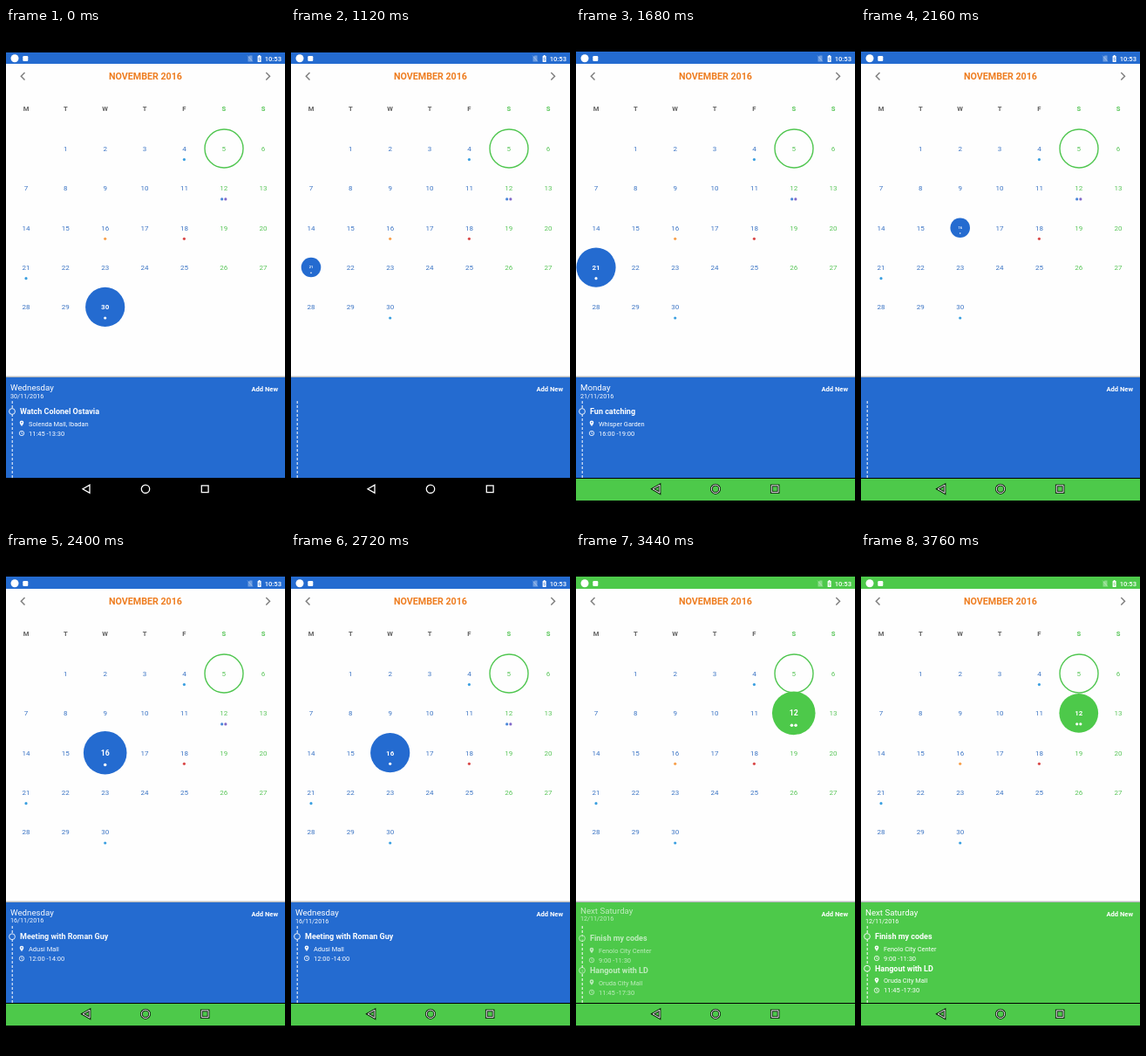
These frames come from a looping animation (320x569 px, 3840 ms). An HTML page:

```html
<!DOCTYPE html>
<html lang="en">
<head>
<meta charset="utf-8">
<title>Calendar</title>
<style>
  html, body { margin: 0; width: 100%; height: 100%; overflow: hidden; background: #000; }
  svg { display: block; width: 100vw; height: 100vh; }
  text { font-family: Roboto, "Noto Sans", sans-serif; white-space: pre; }
</style>
</head>
<body>
<svg id="stage" viewBox="0 0 320 569"></svg>
<script>
const LOOP = 3840, STEP = 80, SETTLE = 560;
const BLUE = '#246bd0', GREEN = '#4dc94a', SKY = '#3a9fe0';
const NAV_GREEN_AT = 1200;

const picks = [
  { at: -1120, day: 30, name: 'Wednesday', tint: BLUE,
    events: [['Watch Colonel Ostavia', 'Solenda Mall, Ibadan', '11:45 -13:30']] },
  { at: 1120, day: 21, name: 'Monday', tint: BLUE,
    events: [['Fun catching', 'Whisper Garden', '16:00 -19:00']] },
  { at: 2160, day: 16, name: 'Wednesday', tint: BLUE,
    events: [['Meeting with Roman Guy', 'Adusi Mall', '12:00 -14:00']] },
  { at: 3280, day: 12, name: 'Next Saturday', tint: GREEN,
    events: [['Finish my codes', 'Fenolo City Center', '9:00 -11:30'],
             ['Hangout with LD', 'Oruda City Mall', '11:45 -17:30']] }
];
const dots = { 4: [SKY], 12: ['#4a86d8', '#8068c8'], 16: ['#f8a04c'], 18: ['#d94848'], 21: [SKY], 30: [SKY] };

const colX = c => 23 + 45.35 * c;
const rowY = r => 138 + 45.35 * r;

// Text placed by the vertical middle of its capitals
const text = (s, x, y, size, fill = '#fff', weight = 400, anchor = 'start') =>
  `<text x="${x}" y="${y + size * 0.356}" font-size="${size}" fill="${fill}" font-weight="${weight}" text-anchor="${anchor}">${s}</text>`;
const rect = (x, y, w, h, fill, more = '') =>
  `<rect x="${x}" y="${y}" width="${w}" height="${h}" fill="${fill}" ${more}/>`;
const disc = (x, y, r, fill, more = '') =>
  `<circle cx="${x}" cy="${y}" r="${r}" fill="${fill}" ${more}/>`;
const line = (d, stroke, width, more = '') =>
  `<path d="${d}" fill="none" stroke="${stroke}" stroke-width="${width}" ${more}/>`;

// Underdamped spring from half size to full size
function spring(ms) {
  if (ms >= SETTLE) return 1;
  const s = ms / 1000, k = 7, w = 16;
  return 1 - 0.5 * Math.exp(-k * s) * (Math.cos(w * s) + k / w * Math.sin(w * s));
}

function statusBar(tint, top) {
  return rect(0, top, 320, 41 - top, tint) +
    disc(10, 34.8, 4.5, '#fff') +
    rect(19.3, 32, 6, 6, '#fff', 'rx="1.2"') +
    `<path d="M277.5 33.5l2-2h3v7h-5z" fill="#fff" opacity=".35"/>` +
    line('M277 31.5l6 7', '#fff', 0.6, 'opacity=".5"') +
    rect(288.6, 32, 4, 7, '#fff', 'rx=".5"') + rect(289.7, 31, 1.8, 1, '#fff') +
    line('M290.9 33.2l-1 2.4h1.4l-1 2.3', tint, 0.6) +
    text('10:53', 316, 35, 7.6, '#fff', 500, 'end');
}

function dayCell(day, x, y, color, selected) {
  const marks = dots[day] || [];
  return text(day, x, y, 8, color, selected ? 700 : 400, 'middle') +
    marks.map((c, i) => disc(x + (i - (marks.length - 1) / 2) * 4.2, y + 12.6, 1.6, selected ? '#fff' : c)).join('');
}

function calendar(pick, scale) {
  let out = rect(0, 41, 320, 359, '#fefefe') +
    text('NOVEMBER 2016', 160, 55.5, 10.7, '#ee7d20', 700, 'middle') +
    line('M21.5 51l-4.2 4.3 4.2 4.3M298.3 51l4.2 4.3-4.2 4.3', '#808080', 1.5);
  [...'MTWTFSS'].forEach((c, i) => {
    out += text(c, colX(i), 92, 7.6, i > 4 ? '#58c558' : '#606060', 700, 'middle');
  });
  out += disc(250, 138, 22, 'none', `stroke="#50c650" stroke-width="1.4"`);
  let top = '';
  for (let day = 1; day <= 30; day++) {
    const c = day % 7, x = colX(c), y = rowY(Math.floor(day / 7));
    if (day === pick.day) {
      top = `<g transform="translate(${x} ${y}) scale(${scale})">` +
        disc(0, 0, 22.6, pick.tint) + dayCell(day, 0, 0, '#fff', true) + '</g>';
    } else {
      out += dayCell(day, x, y, c > 4 ? '#58c558' : '#3b74c4', false);
    }
  }
  return out + top;
}

function eventRow([title, place, time], i, tint) {
  const y = 439 + 36.7 * i;
  return disc(7, y, 3.4, tint, 'stroke="#fff" stroke-width=".9"') +
    text(title, 16, y, 9, '#fff', 700) +
    `<path d="M18 ${y + 17}q-2.3-2.8-2.3-4.2a2.3 2.3 0 0 1 4.6 0q0 1.4-2.3 4.2z" fill="#fff"/>` +
    disc(18, y + 12.8, 0.8, tint) +
    text(place, 26, y + 14, 7.45) +
    disc(18, y + 25, 2.7, 'none', 'stroke="#fff" stroke-width=".8"') +
    line(`M18 ${y + 23.3}v1.9l1.3.8`, '#fff', 0.7) +
    text(time, 26, y + 25, 7.5);
}

function panel(pick, age) {
  const p = Math.min(1, age / 250), shift = 6 * (1 - p);
  const fade = (dy, body) => `<g opacity="${p}" transform="translate(0 ${dy})">${body}</g>`;
  return rect(0, 398, 320, 1, '#e4e4e4') + rect(0, 399, 320, 1, '#b4b8bc') +
    rect(0, 400, 320, 115, pick.tint) +
    line('M7.2 427V515', '#fff', 1, 'stroke-dasharray="3 2"') +
    text('Add New', 312, 413.3, 7.6, '#fff', 700, 'end') +
    fade(-shift, text(pick.name, 5, 411.3, 9.7) + text(`${pick.day}/11/2016`, 5, 421, 7.2)) +
    fade(shift, pick.events.map((e, i) => eventRow(e, i, pick.tint)).join(''));
}

function navBar(green) {
  const icons = 'M88 527.7l8-4.6v9.2zM155.3 527.8a4.7 4.7 0 1 0 9.4 0a4.7 4.7 0 1 0-9.4 0zM224.3 523.8h7.8v7.8h-7.8z';
  return (green ? rect(0, 516, 320, 25, GREEN) + line(icons, '#102010', 2.8) : '') +
    line(icons, '#fff', green ? 0.9 : 1.3);
}

function scene(t) {
  const pick = picks.filter(p => p.at <= t).pop();
  const age = t - pick.at, green = t >= NAV_GREEN_AT;
  return rect(0, 0, 320, 569, '#000') + statusBar(pick.tint, green ? 27 : 28) +
    calendar(pick, spring(age)) + panel(pick, age) + navBar(green);
}

const stage = document.getElementById('stage');
let shown = -1;
function draw() {
  const t = Math.floor(performance.now() % LOOP / STEP) * STEP;
  if (t !== shown) {
    stage.innerHTML = scene(t);
    shown = t;
  }
  requestAnimationFrame(draw);
}
draw();
</script>
</body>
</html>
```
